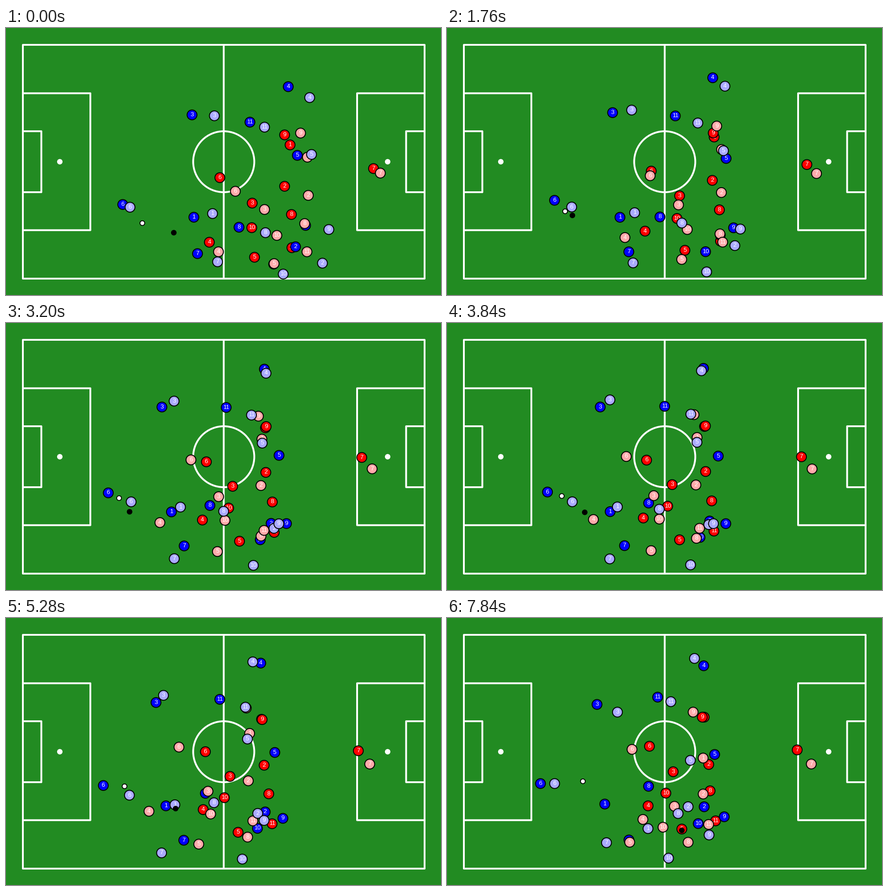
A matplotlib script for the animation above (8000 ms loop, 954x587 px).

```python
import numpy as np
import matplotlib.pyplot as plt
from matplotlib.animation import FuncAnimation
from matplotlib.patches import Circle, Rectangle

W, H, DPI = 954, 587, 64
PT = 72 / DPI  # points per pixel
FRAMES, STEP = 50, 160
TURN, LAST = 28, FRAMES - 1
T = np.arange(FRAMES)

fig = plt.figure(figsize=(W / DPI, H / DPI), dpi=DPI, facecolor="#228b22")
ax = fig.add_axes([0, 0, 1, 1])
ax.set_xlim(0, W)
ax.set_ylim(H, 0)
ax.axis("off")


def draw_pitch(cx=477.5, cy=294, half_w=440.5, half_h=257):
    line = dict(fill=False, ec="white", lw=4 * PT, joinstyle="round", snap=False, zorder=1)
    ax.add_patch(Rectangle((cx - half_w, cy - half_h), 2 * half_w, 2 * half_h, **line))
    ax.add_patch(Circle((cx, cy), 67, **line))
    ax.plot([cx, cx], [cy - half_h, cy + half_h], color="white", lw=4 * PT, snap=False, zorder=1)
    for side in (-1, 1):
        for depth, half in ((148, 150.5), (40.5, 67)):
            ax.add_patch(Rectangle((cx + side * half_w, cy - half), -side * depth, 2 * half, **line))
        ax.add_patch(Circle((cx + side * 359.5, cy), 6, color="white", lw=0, zorder=1))


def drift():
    """Weights of the turn and the finish for the slowly settling discs."""
    bend = T * (T - TURN) * (T - LAST) * 1e-5
    turn = T * (TURN + LAST - T) / (TURN * LAST) + bend
    finish = T * (T - TURN) / (LAST * (LAST - TURN)) - 1.2 * bend
    return turn, finish


def run():
    """The same weights for the pale discs: brisk run, then a late change of course."""
    s = T / TURN
    turn = s + 0.571 * s * (1 - s) * np.tanh(2 * s)
    finish = (np.maximum(T - TURN, 0) / (LAST - TURN)) ** 1.5
    return turn, finish


movers = []


def add_mover(color, radius, edge, label, path):
    z = 2 + len(movers)
    disc = Circle((0, 0), radius, fc=color, ec="black", lw=edge * PT, zorder=z)
    ax.add_patch(disc)
    text = ax.text(0, 0, label, color="white", family="Liberation Sans",
                   size=13 * PT, ha="center", va="center", zorder=z)
    movers.append((disc, text, path))


def team(color, ease, *players):
    """Each player has three key points: start, turn and finish."""
    turn_w, finish_w = (w[:, None] for w in ease())
    for number, keys in enumerate(players, 1):
        start, turn, finish = np.array(keys, float).reshape(3, 2)
        path = start + turn_w * (turn - start) + finish_w * (finish - turn)
        add_mover(color, 10.8, 2, str(number), path)


def ball(color, times, xs, ys):
    """Straight legs from one touch to the next."""
    path = np.column_stack([np.interp(T, times, xs), np.interp(T, times, ys)])
    add_mover(color, 5.2, 1.8, "", path)


draw_pitch()

team("#ff0000", drift,
     (623, 257, 562, 225, 564, 218),
     (611, 348, 566, 325, 574, 322),
     (540, 385, 492, 352, 496, 338),
     (446, 471, 431, 425, 441, 413),
     (545, 504, 509, 474, 515, 464),
     (469, 329, 437, 298, 444, 282),
     (806, 309, 775, 293, 768, 290),
     (626, 410, 578, 389, 577, 380),
     (611, 235, 564, 225, 560, 218),
     (539, 439, 481, 399, 480, 385),
     (627, 483, 584, 455, 589, 446))

team("#0000ff", drift,
     (412, 416, 354, 414, 346, 409),
     (635, 481, 572, 431, 564, 415),
     (408, 191, 332, 185, 329, 190),
     (619, 129, 560, 99, 563, 105),
     (639, 280, 592, 294, 587, 300),
     (256, 388, 217, 370, 205, 364),
     (420, 496, 389, 489, 399, 488),
     (511, 438, 439, 391, 442, 370),
     (657, 434, 609, 441, 608, 437),
     (587, 519, 553, 467, 551, 452),
     (535, 207, 473, 181, 462, 174))

ball("white", (0, 11, 20, 33, LAST), (299, 259, 248, 260, 298), (429, 403, 385, 370, 359))

team("#ffaaaa", run,
     (661, 284, 539, 249, 562, 308),
     (663, 368, 536, 355, 562, 387),
     (567, 399, 444, 378, 499, 414),
     (466, 492, 309, 427, 430, 443),
     (588, 518, 436, 499, 401, 493),
     (503, 359, 384, 288, 406, 289),
     (821, 319, 799, 321, 799, 321),
     (655, 430, 538, 477, 529, 493),
     (646, 231, 533, 199, 540, 207),
     (594, 456, 455, 429, 474, 460),
     (660, 492, 545, 448, 574, 454))

team("#aaaaff", run,
     (453, 408, 367, 404, 441, 463),
     (694, 517, 564, 437, 529, 415),
     (457, 193, 349, 167, 374, 207),
     (666, 153, 549, 101, 543, 89),
     (670, 278, 538, 261, 534, 313),
     (272, 394, 275, 393, 236, 364),
     (464, 514, 348, 519, 350, 494),
     (569, 450, 457, 406, 507, 430),
     (708, 443, 574, 441, 575, 477),
     (608, 541, 528, 531, 486, 528),
     (567, 218, 532, 199, 491, 184))

ball("black", (0, 11, 20, 33, 41, LAST),
     (368, 275, 271, 372, 406, 515), (450, 412, 415, 419, 448, 467))


def update(frame):
    for disc, text, path in movers:
        disc.center = path[frame]
        text.set_position(path[frame])
    return []


anim = FuncAnimation(fig, update, frames=FRAMES, interval=STEP, repeat=True, repeat_delay=0)
plt.show()
```
